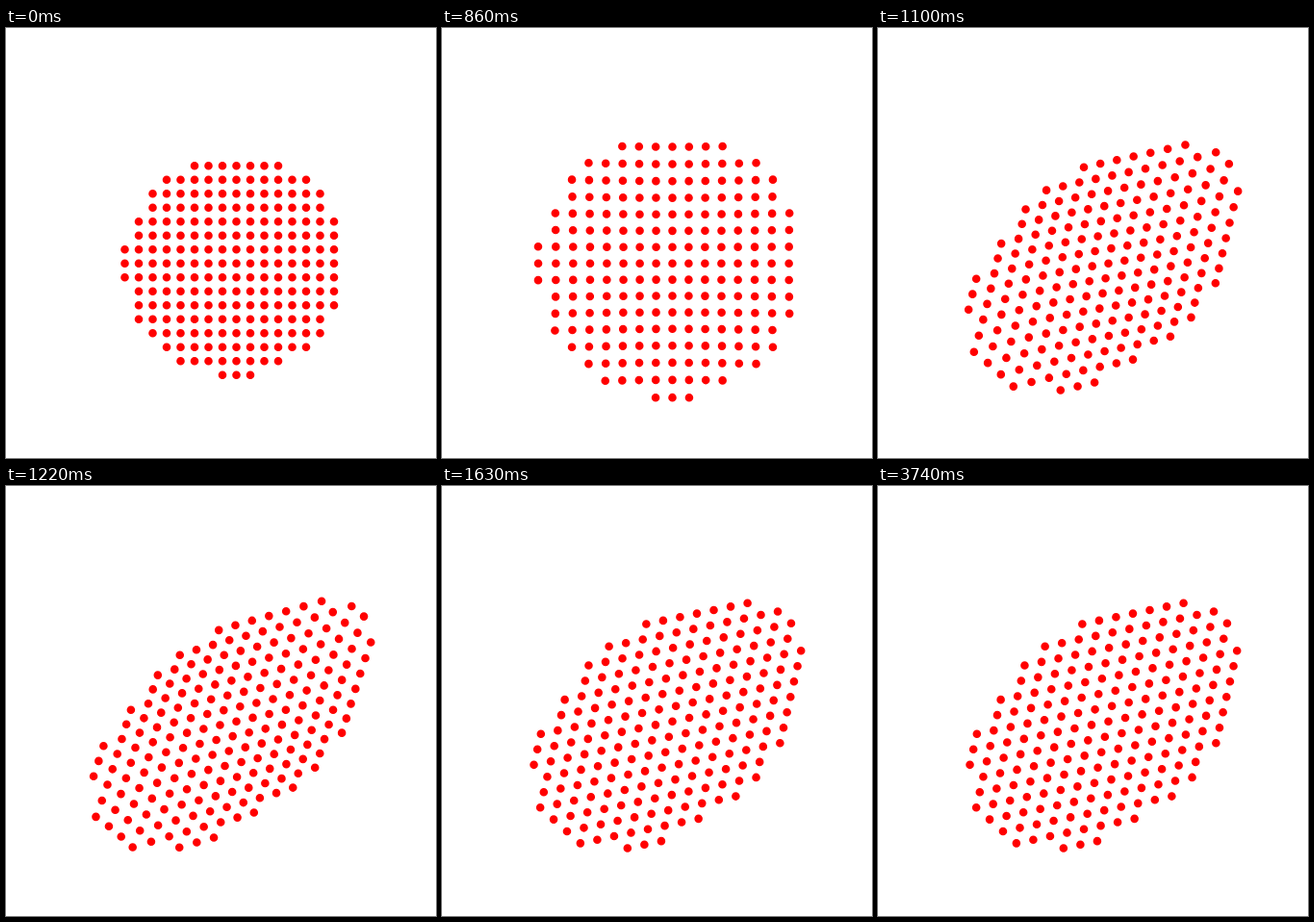
An HTML page with a canvas for the animation above (4.73 s loop, 447 by 447 pixels).

```html
<!DOCTYPE html>
<html lang="en">
<head>
<meta charset="utf-8">
<title>Dot lattice deformation</title>
<style>
  html, body { margin: 0; width: 100%; height: 100%; overflow: hidden; background: #fff; }
  canvas { display: block; width: 447px; height: 447px; }
</style>
</head>
<body>
<canvas id="stage" width="447" height="447"></canvas>
<script>
const ctx = document.getElementById('stage').getContext('2d');
const SIZE = 447, LOOP = 4730;
const CX = 239.5, CY = 244.7, PITCH = 14.5, DOT = 4.3;
const REACH = 8;      // disc radius in lattice cells
const RIM = 7.75;     // radius where the interior lag vanishes
const STRETCH = 0.21; // axial strain relative to shear
const LAST_STEP = 17, PEAK_STEP = 12;

const mix = (a, b, t) => a + (b - a) * Math.min(1, Math.max(0, t));

function stepAt(t) {
  if (t < 680) return 0;
  if (t >= 1630) return LAST_STEP;
  return 1 + Math.floor((t - 680) / 60);
}

// The disc swells evenly, then settles slightly smaller.
function growthAt(step) {
  return step <= 4 ? 0.05 * step : 0.157;
}

// Shear starts quickly, rises steadily to its peak and partly springs back.
function shearAt(step) {
  if (step <= 6) return mix(0, 0.192, (step - 4) / 2);
  if (step <= PEAK_STEP) return mix(0.192, 0.428, (step - 6) / (PEAK_STEP - 6));
  return mix(0.428, 0.251, (step - PEAK_STEP) / (LAST_STEP - PEAK_STEP));
}

// While the rim moves, the inside trails behind it.
function lagAt(step) {
  return 0.26 * Math.sin(Math.PI * step / LAST_STEP);
}

function drawLattice({ growth, shear, turn = 0, lag = 0 }, color) {
  const axial = STRETCH * shear;
  ctx.fillStyle = color;
  ctx.beginPath();
  for (let row = -REACH; row <= REACH; row++) {
    for (let col = -REACH; col <= REACH; col++) {
      if ((col + 0.1) ** 2 + (row - 0.1) ** 2 > REACH ** 2) continue;
      const follow = 1 - lag * (1 - (col * col + row * row) / RIM ** 2);
      const dx = (growth + axial) * col + (turn - shear) * row;
      const dy = (growth - axial) * row - (turn + shear) * col;
      const x = CX + PITCH * (col + follow * dx);
      const y = CY + PITCH * (row + follow * dy);
      ctx.moveTo(x + DOT, y);
      ctx.arc(x, y, DOT, 0, Math.PI * 2);
    }
  }
  ctx.fill();
}

function draw(t) {
  ctx.fillStyle = '#fff';
  ctx.fillRect(0, 0, SIZE, SIZE);
  if (t >= 2430 && t < 3740) {
    drawLattice({ growth: 0.145, shear: 0.25, turn: 0.047 }, '#0f0');
  }
  const step = stepAt(t);
  drawLattice({ growth: growthAt(step), shear: shearAt(step), lag: lagAt(step) }, '#f00');
}

const start = performance.now();
function tick() {
  draw((performance.now() - start) % LOOP);
  requestAnimationFrame(tick);
}
tick();
</script>
</body>
</html>
```
